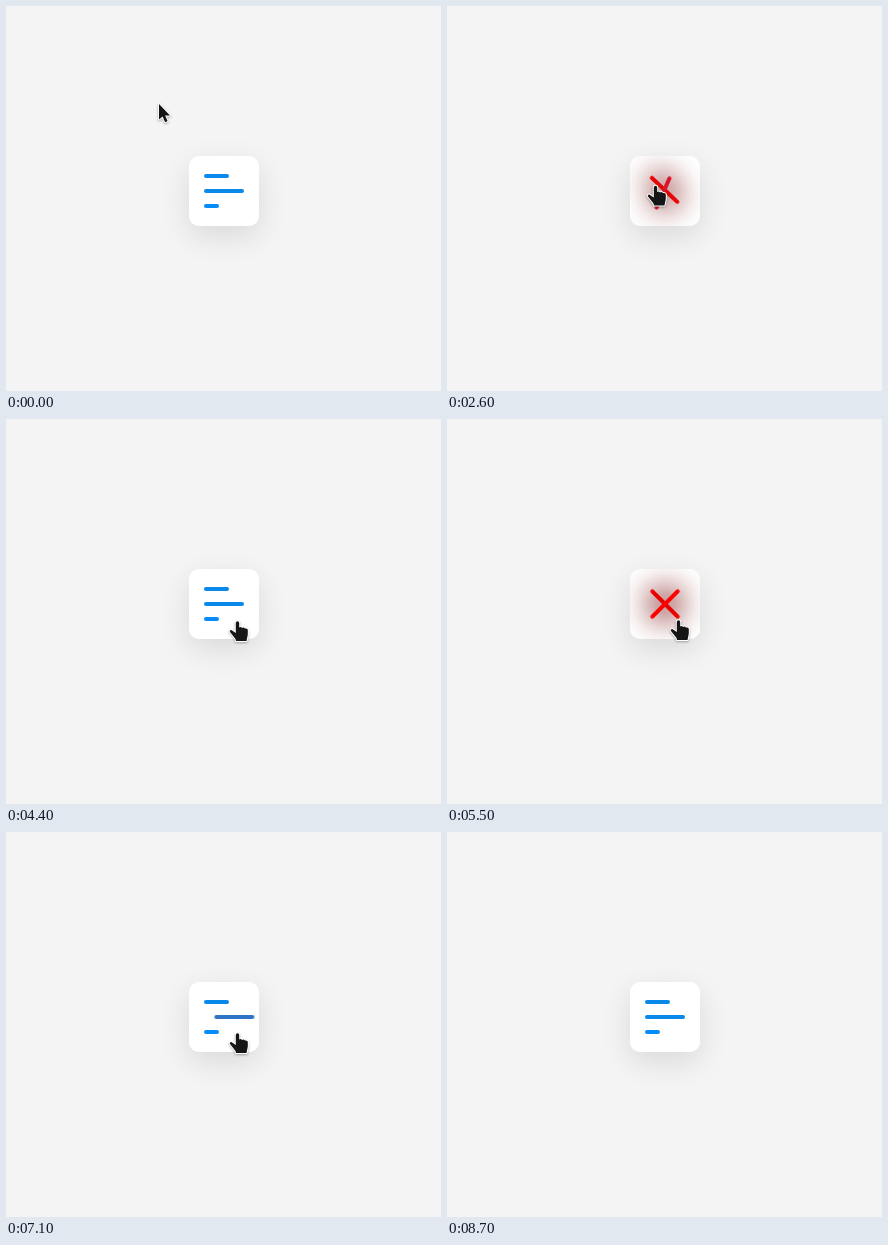
Recreate the animation shown at these times as an HTML page. Size 435 by 385 pixels, loop 9000 ms.

```html
<!DOCTYPE html>
<html lang="en">
<head>
<meta charset="utf-8">
<title>Menu button</title>
<style>
  html, body { margin: 0; width: 100%; height: 100%; overflow: hidden; background: #f4f4f4; }
  .button, .face, .bar, .cursor { position: absolute; }
  .button {
    left: 183px; top: 150px; width: 70px; height: 70px;
    border-radius: 10px; box-shadow: 0 10px 30px rgba(0, 0, 0, .11);
  }
  .face { inset: 0; overflow: hidden; border-radius: 10px; background: #fff; }
  .bar { left: 15px; height: 4px; border-radius: 4px; }
  .cursor { left: 0; top: 0; width: 435px; height: 385px; }
  .cursor path {
    fill: #151515; stroke: #fff; stroke-width: 2; stroke-linejoin: round; paint-order: stroke;
    filter: drop-shadow(0 1px 1px rgba(0, 0, 0, .3));
  }
</style>
</head>
<body>
<div class="button">
  <div class="face">
    <div class="bar" id="top"></div>
    <div class="bar" id="middle"></div>
    <div class="bar" id="bottom"></div>
  </div>
</div>
<svg class="cursor" viewBox="0 0 435 385">
  <g id="pointer">
    <path id="arrow" d="M0 0V15.5L3.6 12.4L6.1 18.2L8.6 17.1L6.1 11.4H11Z"/>
    <path id="hand" d="M-1.7 1.5Q-1.7-.2 0-.2T1.7 1.5V6q1.5-1 3 .4q1.5-.8 2.8.7q2-.5 2.8 1.2V13L9 19.6H-1.5L-2 17.5L-7.5 10.5q-.8-2 1.3-2.1L-1.7 11.5Z"/>
  </g>
</svg>
<script>
const LOOP = 9000, STEP = 100, CLOSE_TIME = 500;
const $ = id => document.getElementById(id);

// [time opened, time closed]
const toggles = [[2120, 3420], [4620, 5820], [7020, 8120]];

const glow = alpha => `0 0 28px 4px rgba(120, 10, 10, ${alpha})`;
const look = (top, width, color, transform, alpha = 0) => ({
  top: top + 'px', width: width + 'px', backgroundColor: color, transform, boxShadow: glow(alpha)
});

function animateBar(id, closed, open, delay, duration) {
  const frames = [{ ...closed, offset: 0 }];
  const add = (pose, time, easing = 'linear') => frames.push({ ...pose, offset: time / LOOP, easing });
  for (const [opened, shut] of toggles) {
    add(closed, opened + delay, 'ease');
    add(open, opened + delay + duration);
    add(open, shut, 'ease');
    add(closed, shut + CLOSE_TIME);
  }
  add(closed, LOOP);
  const animation = $(id).animate(frames, { duration: LOOP, fill: 'both' });
  animation.pause();
  return animation;
}

const bars = [
  animateBar('top', look(18, 25, '#0a89ea', 'rotate(0deg)'),
    look(33, 40, '#f00', 'rotate(45deg)', .72), 100, 500),
  animateBar('middle', look(33, 40, '#0a89ea', 'translateX(0px)'),
    look(33, 40, '#f00', 'translateX(68px)'), 0, 600),
  animateBar('bottom', look(48, 15, '#068cf8', 'rotate(0deg)'),
    look(33, 40, '#f00', 'rotate(135deg)', .72), 100, 700)
];

// [time, x, y, shape]; each stop holds until the next
const stops = [
  [0, 153, 98, 'arrow'], [300, 212, 92, 'arrow'], [400, 275, 104, 'arrow'],
  [600, 240, 65, 'arrow'], [700, 180, 51, 'arrow'], [800, 129, 130, 'arrow'],
  [900, 148, 240, 'arrow'], [1000, 225, 296, 'arrow'], [1100, 302, 193, 'arrow'],
  [1300, 260, 95, 'arrow'], [1400, 190, 100, 'arrow'], [1500, 156, 142, 'arrow'],
  [1700, 172, 126, 'arrow'], [1800, 205, 132, 'arrow'], [1900, 225, 160, 'hand'],
  [2000, 208.5, 180, 'hand'], [4100, 220, 205, 'hand'], [4200, 229, 226, 'arrow'],
  [4400, 231.5, 202.5, 'hand'], [4700, 231.5, 201.5, 'hand'],
  [8400, 205, 155, 'hand'], [8500, 132, 82, 'arrow'], [8600, 61, 16, 'arrow'],
  [8700, 0, 0, 'none']
];

function draw(now) {
  const time = Math.floor(now % LOOP / STEP) * STEP;
  for (const bar of bars) bar.currentTime = time;
  const [, x, y, shape] = stops.filter(stop => stop[0] <= time).pop();
  $('pointer').setAttribute('transform', `translate(${x} ${y})`);
  for (const id of ['arrow', 'hand']) $(id).style.display = id === shape ? '' : 'none';
}

const start = performance.now();
function tick() {
  draw(performance.now() - start);
  requestAnimationFrame(tick);
}
tick();
</script>
</body>
</html>
```
